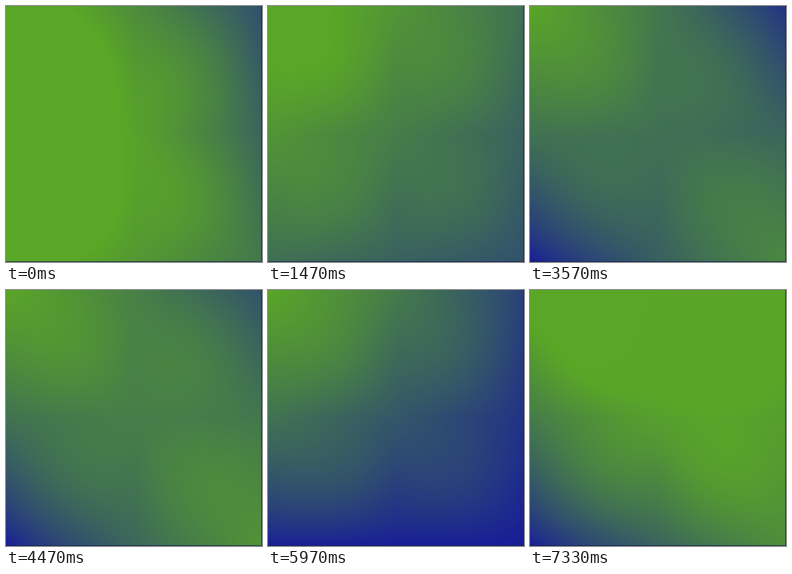
An HTML page with a canvas that plays this animation: 256x256 px, repeating every 8 s.

```html
<!DOCTYPE html>
<html lang="en">
<head>
<meta charset="utf-8">
<title>Gradient field</title>
<style>
  html, body { margin: 0; width: 100%; height: 100%; overflow: hidden; background: #3f7050; }
  canvas { display: block; width: 100vw; height: 100vh; }
</style>
</head>
<body>
<canvas id="field" width="256" height="256"></canvas>
<script>
const SIZE = 256, STEP = 1000, MOVE = 400;
const BLUE = [20, 21, 158], GREEN = [90, 166, 38];
const CURVE = .65, RIPPLE = .07;

// Greenness at the four corners and an extra lift in the middle.
// The field moves on to the next pose every STEP ms.
const poses = [
  { corners: [1.15, .4, 1.1, .68], lift: .1 },
  { corners: [1.15, .4, 1.1, .68], lift: .02 },
  { corners: [1.1, .62, .62, .42], lift: 0 },
  { corners: [1, .08, .45, .12], lift: .28 },
  { corners: [1, .2, .02, .8], lift: .03 },
  { corners: [1, .42, .03, .88], lift: .06 },
  { corners: [1, .3, .05, .05], lift: 0 },
  { corners: [1.05, .7, .04, .5], lift: .06 },
  { corners: [1.1, 1.05, .03, .85], lift: .12 }
];
const LOOP = STEP * (poses.length - 1);

const mix = (a, b, k) => a + (b - a) * k;
const clamp = v => Math.min(1, Math.max(0, v));

// Blend the corners on a curve that favours green, then add the middle
// lift and one faint swell per quadrant.
function buildField({ corners, lift }) {
  const [tl, tr, bl, br] = corners.map(c => c ** (1 / CURVE));
  return Float32Array.from({ length: SIZE * SIZE }, (_, i) => {
    const u = (i % SIZE) / SIZE, v = Math.floor(i / SIZE) / SIZE;
    const base = mix(mix(tl, tr, u), mix(bl, br, u), v) ** CURVE;
    const dome = Math.sin(Math.PI * u) * Math.sin(Math.PI * v);
    const swell = Math.abs(Math.sin(2 * Math.PI * u) * Math.sin(2 * Math.PI * v));
    return clamp(base + lift * dome + RIPPLE * swell);
  });
}

const fields = poses.map(buildField);
const ctx = document.getElementById('field').getContext('2d');
const image = ctx.createImageData(SIZE, SIZE);
let shown = '';

function draw(time) {
  const n = Math.floor(time / STEP);
  const left = 1 - clamp((time % STEP) / MOVE), k = 1 - left * left;
  const key = n + ':' + k;
  if (key === shown) return;
  shown = key;

  const from = fields[n], to = fields[n + 1], px = image.data;
  for (let i = 0; i < to.length; i++) {
    const g = mix(from[i], to[i], k);
    for (let c = 0; c < 3; c++) px[i * 4 + c] = mix(BLUE[c], GREEN[c], g);
    px[i * 4 + 3] = 255;
  }
  ctx.putImageData(image, 0, 0);

  // Thin shaded rim on the right and bottom
  ctx.fillStyle = 'rgba(20, 40, 80, .6)';
  ctx.fillRect(SIZE - 1, 0, 1, SIZE);
  ctx.fillRect(0, SIZE - 1, SIZE - 1, 1);
}

const begin = performance.now();
function tick() {
  draw(Math.max(0, performance.now() - begin) % LOOP);
  requestAnimationFrame(tick);
}
tick();
</script>
</body>
</html>
```
